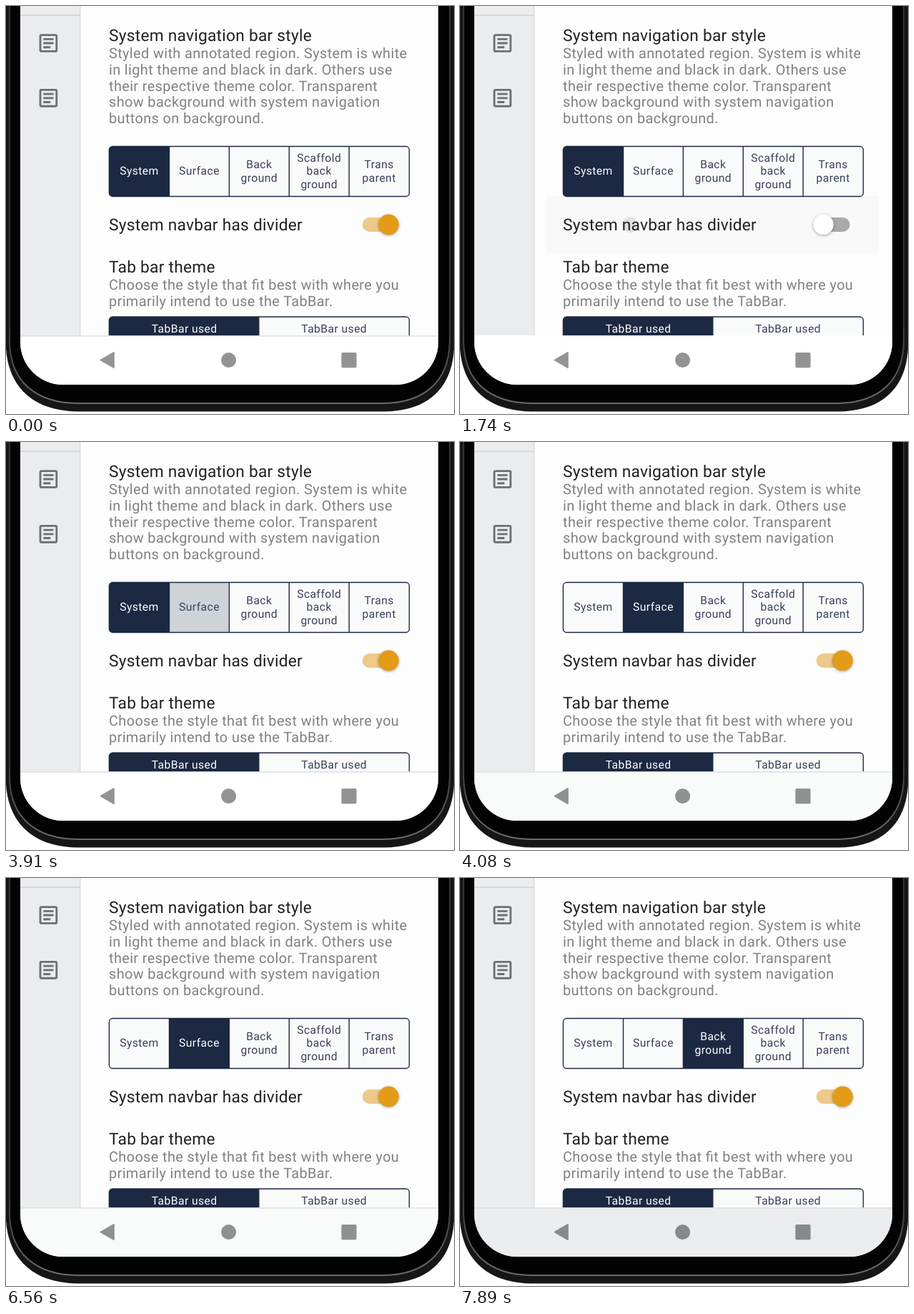
An HTML page for the animation above (8 s loop, 627 by 571 pixels).

```html
<!DOCTYPE html>
<html lang="en">
<head>
<meta charset="utf-8">
<title>System navigation bar settings</title>
<style>
  html, body { margin: 0; width: 100%; height: 100%; overflow: hidden; background: #fff; }
  svg {
    display: block; width: 627px; height: 571px;
    --navy: #1c2942; --surface: #f9fbfb; --ink: #37425a;
    font-family: Roboto, sans-serif;
    font-feature-settings: "liga";
    text-rendering: geometricPrecision;
    animation: toggle 8s step-end infinite, select 8s step-end infinite;
  }

  /* --on: switch position, --hl: row highlight, --x --r --a: ripple */
  @keyframes toggle {
    0%      { --on: 1; --line: 1; --hl: 0; --x: 238; --r: 0; --a: 0; }
    6.25%   { --hl: .018; --x: 238; --r: 11; --a: .09; }
    7.5%    { --on: .67; --line: 0; --hl: 0; --x: 271; --r: 141; --a: .045; }
    8.875%  { --on: 0; --a: 0; }
    21.75%  { --hl: .018; --x: 238; --r: 11; --a: .09; }
    22.5%   { --on: .12; --line: 1; --x: 252; --r: 70; --a: .07; }
    23.5%   { --on: .5; --hl: .01; --x: 272; --r: 145; --a: .045; }
    24.5%   { --on: .92; --hl: 0; --x: 300; --r: 230; --a: .02; }
    25.625% { --on: 1; --a: 0; }
    66.5%   { --on: .67; --line: 0; --x: 271; --r: 141; --a: .045; }
    67.375% { --on: 0; --a: 0; }
    79.125% { --hl: .018; --x: 238; --r: 11; --a: .09; }
    80.125% { --on: .25; --line: 1; --hl: .01; --x: 258; --r: 95; --a: .06; }
    81%     { --on: .75; --hl: 0; --x: 285; --r: 190; --a: .03; }
    82%     { --on: 1; --a: 0; }
  }

  /* --s*: segment fill, --t*: segment label */
  @keyframes select {
    0%      { --s1: 1; --t1: 1; --s2: 0; --t2: 0; --s3: 0; --t3: 0; --nav: #fff; }
    48.875% { --s2: .19; }
    49.875% { --s1: .2; --t1: .3; --s2: .9; --t2: .8; --nav: #f8fbfa; }
    51%     { --s1: 0; --t1: 0; --s2: 1; --t2: 1; }
    95.625% { --s3: .19; }
    97.75%  { --s2: .2; --t2: .3; --s3: .9; --t3: .8; --nav: #ebecee; }
    98.625% { --s2: 0; --t2: 0; --s3: 1; --t3: 1; }
  }

  .title { font-size: 22.8px; letter-spacing: .21px; fill: #212121; }
  .sub { font-size: 19.95px; letter-spacing: .356px; fill: #818181; }
  .label { font-size: 15.7px; letter-spacing: .42px; fill: var(--ink); text-anchor: middle; }

  .seg { --s: 0; --t: 0; }
  .seg rect { fill: color-mix(in srgb, var(--navy) calc(var(--s) * 100%), var(--surface)); }
  .seg text { fill: color-mix(in srgb, #fff calc(var(--t) * 100%), var(--ink)); }
  .s1 { --s: var(--s1); --t: var(--t1); }
  .s2 { --s: var(--s2); --t: var(--t2); }
  .s3 { --s: var(--s3); --t: var(--t3); }
  .border { fill: none; stroke: var(--navy); stroke-width: 1.4; }

  .row { opacity: var(--hl); }
  .ripple { cx: calc(var(--x) * 1px); r: calc(var(--r) * 1px); opacity: var(--a); }
  .track { fill: color-mix(in srgb, #edc98b calc(var(--on) * 100%), #a9a9a9); }
  .thumb {
    fill: color-mix(in srgb, #e49b17 calc(var(--on) * 100%), #fff);
    transform: translateX(calc((var(--on) - 1) * 27px));
    filter: drop-shadow(0 1.4px 1px rgba(0, 0, 0, .16)) drop-shadow(0 1px 2px rgba(0, 0, 0, .24));
  }
  .nav { fill: var(--nav); }
  .divider { opacity: var(--line); }
</style>
</head>
<body>
<svg viewBox="0 0 627 571">
  <defs>
    <clipPath id="screen"><path d="M20 -5H605V470A60 60 0 0 1 545 530H80A60 60 0 0 1 20 470Z"/></clipPath>
    <clipPath id="tile"><rect x="121" y="265.5" width="465" height="80"/></clipPath>
    <clipPath id="box"><rect x="144.4" y="196.5" width="420" height="70" rx="5"/></clipPath>
    <linearGradient id="rim" gradientUnits="userSpaceOnUse" x1="0" y1="440" x2="0" y2="556">
      <stop stop-color="#333"/><stop offset="1" stop-color="#6c6c6c"/>
    </linearGradient>
    <g id="article" fill="none" stroke="#6e6f71" stroke-width="2">
      <rect x="-8" y="-8" width="16" height="16" rx="1.2"/>
      <path d="M-5 -4H5M-5 0H5M-5 4H2"/>
    </g>
  </defs>

  <!-- phone body -->
  <path fill="#161616" d="M0 0V480C4 535 40 567 100 567.5H530C590 567 624 535 627 480V0Z"/>
  <path fill="#030303" stroke="url(#rim)" stroke-width="2" d="M5 0V470C6 526 42 555.5 100 556H528C585 555.5 620 526 621 470V0"/>

  <g clip-path="url(#screen)">
    <rect x="20" width="585" height="531" fill="#fdfdfd"/>

    <rect x="20" width="84" height="462" fill="#ebecee"/>
    <rect x="103" width="1.4" height="462" fill="#d9dadc"/>
    <rect x="20" y="12.3" width="84" height="1.4" fill="#cfd0d2"/>
    <use href="#article" transform="translate(59.4 52) scale(1.425)"/>
    <use href="#article" transform="translate(59.4 128.8) scale(1.425)"/>

    <text class="title" x="144" y="49">System navigation bar style</text>
    <g class="sub">
      <text x="144" y="73.2">Styled with annotated region. System is white</text>
      <text x="144" y="96">in light theme and black in dark. Others use</text>
      <text x="144" y="118.7">their respective theme color. Transparent</text>
      <text x="144" y="141.4">show background with system navigation</text>
      <text x="144" y="164.1">buttons on background.</text>
    </g>

    <g clip-path="url(#box)">
      <g class="seg s1"><rect x="144" y="196" width="84.5" height="71"/>
        <text class="label" x="186.5" y="236.4">System</text></g>
      <g class="seg s2"><rect x="228.5" y="196" width="84" height="71"/>
        <text class="label" x="270.5" y="236.4">Surface</text></g>
      <g class="seg s3"><rect x="312.5" y="196" width="84" height="71"/>
        <text class="label" x="354.3" y="227.2">Back</text>
        <text class="label" x="354.3" y="245.6">ground</text></g>
      <g class="seg"><rect x="396" y="196" width="84" height="71"/>
        <text class="label" x="438.2" y="218">Scaffold</text>
        <text class="label" x="438.2" y="236.4">back</text>
        <text class="label" x="438.2" y="254.8">ground</text></g>
      <g class="seg"><rect x="480" y="196" width="85" height="71"/>
        <text class="label" x="522.2" y="227.2">Trans</text>
        <text class="label" x="522.2" y="245.6">parent</text></g>
    </g>
    <path class="border" d="M228.5 197V266M312.4 197V266M396.3 197V266M480.2 197V266"/>
    <rect class="border" x="144.4" y="196.5" width="420" height="70" rx="4.8"/>

    <g clip-path="url(#tile)">
      <rect class="row" x="121" y="265" width="465" height="81"/>
      <circle class="ripple" cy="306"/>
    </g>
    <text class="title" x="144" y="313.8">System navbar has divider</text>
    <rect class="track" x="498.7" y="296" width="47" height="20" rx="10"/>
    <circle class="thumb" cx="535.5" cy="305.8" r="14.3"/>

    <text class="title" x="144" y="373">Tab bar theme</text>
    <g class="sub">
      <text x="144" y="397">Choose the style that fit best with where you</text>
      <text x="144" y="419.7">primarily intend to use the TabBar.</text>
    </g>
    <rect x="144.4" y="435" width="420" height="70" rx="4.8" fill="#f9fbfb"/>
    <path fill="#1c2942" d="M354.5 435H149.2A4.8 4.8 0 0 0 144.4 439.8V480H354.5Z"/>
    <rect class="border" x="144.4" y="435" width="420" height="70" rx="4.8"/>
    <text class="label" x="249.6" y="456.6" style="fill:#fff">TabBar used</text>
    <text class="label" x="459.2" y="456.6">TabBar used</text>

    <rect class="nav" x="20" y="461" width="585" height="70"/>
    <rect class="divider" x="20" y="461" width="585" height="1.6" fill="#dde1e3"/>
    <g opacity=".42">
      <path d="M132.5 495.5L151 484.8V506.2Z" stroke="#000" stroke-width="1.6" stroke-linejoin="round"/>
      <circle cx="311.6" cy="495.6" r="10.5"/>
      <rect x="469.4" y="485" width="21.2" height="21.2" rx="1.6"/>
    </g>
  </g>
</svg>
</body>
</html>
```
